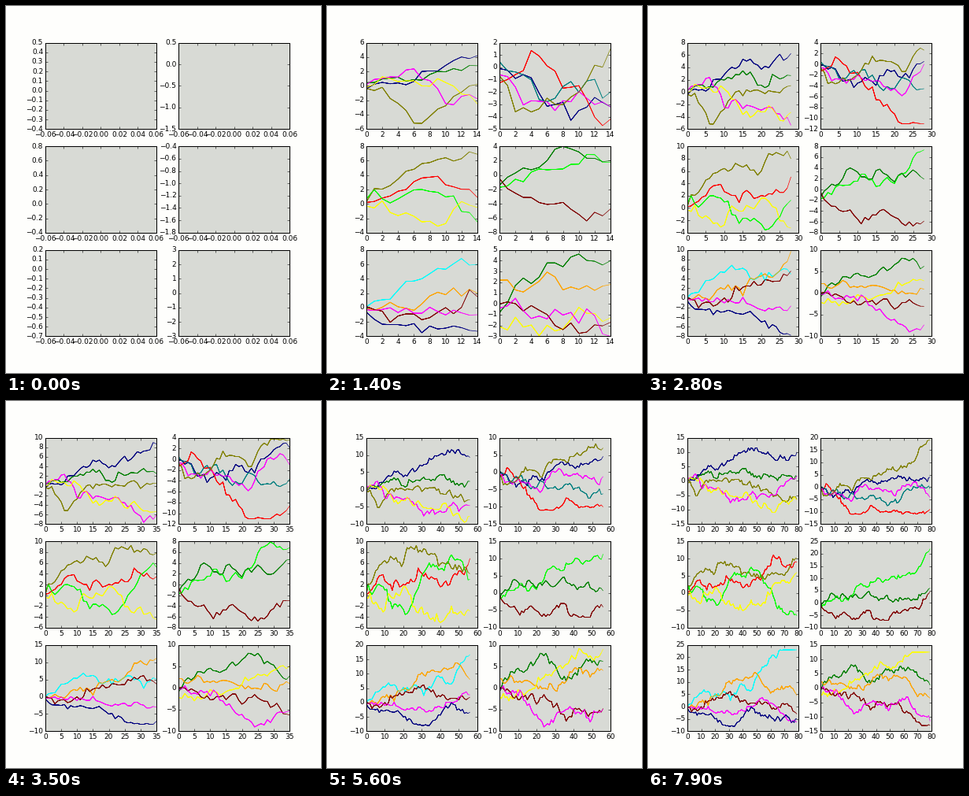
A matplotlib script that plays this animation: 400 by 466 pixels, repeating every 8000 ms.

```python
import matplotlib.pyplot as plt
import numpy as np
from matplotlib.animation import FuncAnimation
from matplotlib.collections import LineCollection
from matplotlib.ticker import AutoLocator

FRAMES, INTERVAL = 80, 100
DPI = 50
OVERLAYS = 6  # the latest plots pile up, so older segments look bolder

plt.style.use("classic")
plt.rcParams.update({
    "font.family": "DejaVu Sans",
    "font.size": 13,
    "axes.facecolor": "#d8dad5",
    "axes.linewidth": 72 / DPI,
    "xtick.major.width": 0.8,
    "ytick.major.width": 0.8,
    "figure.facecolor": "#fefefc",
    "savefig.facecolor": "auto",
    "savefig.dpi": "figure",
})

STEPS = np.arange(FRAMES)
KEY_STEPS = np.array([0, 7, 14, 24, 34, 46, 62, 79])

rng = np.random.default_rng(7)
locator = AutoLocator()
fig, axes = plt.subplots(3, 2, figsize=(400 / DPI, 466 / DPI), dpi=DPI)


def walk(key_values):
    """Random walk that passes through the key values."""
    noise = rng.normal(0, 0.7, FRAMES).cumsum()
    noise -= np.interp(STEPS, KEY_STEPS, noise[KEY_STEPS])
    return np.interp(STEPS, KEY_STEPS, key_values) + noise


def fit(set_ticks, set_limits, low, high):
    """Round the limits outwards to whole ticks."""
    ticks = locator.tick_values(*locator.nonsingular(low, high))
    set_ticks(ticks)
    set_limits(ticks[0], ticks[-1])


class Panel:
    def __init__(self, ax, **keys):
        self.ax = ax
        band = np.array(list(keys.values()))
        self.walks = np.clip([walk(k) for k in band], band.min(), band.max())
        self.points = [np.column_stack((STEPS, w)) for w in self.walks]
        self.lines = LineCollection([], colors=list(keys), linewidths=1.0,
                                    capstyle="butt", joinstyle="round")
        ax.add_collection(self.lines, autolim=False)

    def show(self, step):
        ends = range(max(1, step - OVERLAYS + 1), step + 1)
        self.lines.set_segments([p[:end + 1] for end in ends for p in self.points])
        seen = self.walks[:, :step + 1]
        ax = self.ax
        fit(ax.set_xticks, ax.set_xlim, 0, step)
        fit(ax.set_yticks, ax.set_ylim, seen.min(), seen.max())


panels = [
    Panel(axes[0, 0],
          navy=(-.4, 2, 4.2, 5.5, 9, 11.5, 8, 10),
          green=(.45, .8, 2.8, 2.5, 3, 2, 1.5, 1.5),
          olive=(-.35, -5.2, .2, 0, .5, -1.5, -5.5, -6.5),
          magenta=(.2, 1, -1.8, -3.5, -7, -4.5, -5, 1.8),
          yellow=(-.2, 0, -2.5, -3.5, -5.5, -6.5, -11, -6.5)),
    Panel(axes[0, 1],
          navy=(-.1, -3, -3.2, -2.5, 3, 2.5, 2.5, 4),
          red=(-1.25, -.3, -4.2, -11, -9.5, -10, -10, -9),
          teal=(.45, -2.5, -2, -3, -4.5, -6, -1, -.8),
          magenta=(-.6, -3.5, -3.2, -4, 0, -1, 1, -4.2),
          olive=(-.7, -3, 1.5, 0, 3.5, 6, 8, 19)),
    Panel(axes[1, 0],
          red=(.2, 3.6, .9, 3, 3, 3, 11, 9),
          olive=(.3, 5.6, 6.9, 9, 7.5, 5, 5.5, 10),
          lime=(.7, 2, -2.5, -2, 6, 7.5, -1, -6.5),
          yellow=(-.3, -2.5, -.5, 0, -4.2, -2, 2.5, 6)),
    Panel(axes[1, 1],
          lime=(-1.7, .8, 1.8, 4, 6.5, 9, 11.5, 22),
          green=(-1.4, 3.6, 2, 3, 4.5, 2, 1.5, 6),
          maroon=(-.5, -4, -4.7, -6, -3, -7, -3, 4.5)),
    Panel(axes[2, 0],
          cyan=(.1, 4, 6, 5, 5.5, 6.5, 21, 23),
          orange=(-.1, .5, 2, 5, 10.5, 12, 6, 4.5),
          maroon=(.15, -1.7, 1.5, 3.5, 4.5, 1.5, -.5, -3),
          magenta=(-.3, -.8, -1, -2, -2.8, 0, 1, -6),
          navy=(-.65, -3.5, -3.3, -6, -8, 0, -5, -5)),
    Panel(axes[2, 1],
          green=(-.8, 3.8, 4, 7.5, 2, 6, 6.5, 1),
          orange=(2.2, 2.5, 1.8, 0, 1.5, 4, 3.5, -3.5),
          yellow=(-2.1, -2.5, -1.3, 2.5, 4.5, 8, 11, 12.5),
          maroon=(0, -2, -1.7, -1.5, -6, -5, -8, -13),
          magenta=(-.4, -.5, -3, -9, -5.5, -5, -3, -11.5)),
]


def draw(step):
    for panel in panels:
        panel.show(step)


anim = FuncAnimation(fig, draw, frames=FRAMES, interval=INTERVAL,
                     repeat=True, repeat_delay=0, blit=False)
plt.show()
```
